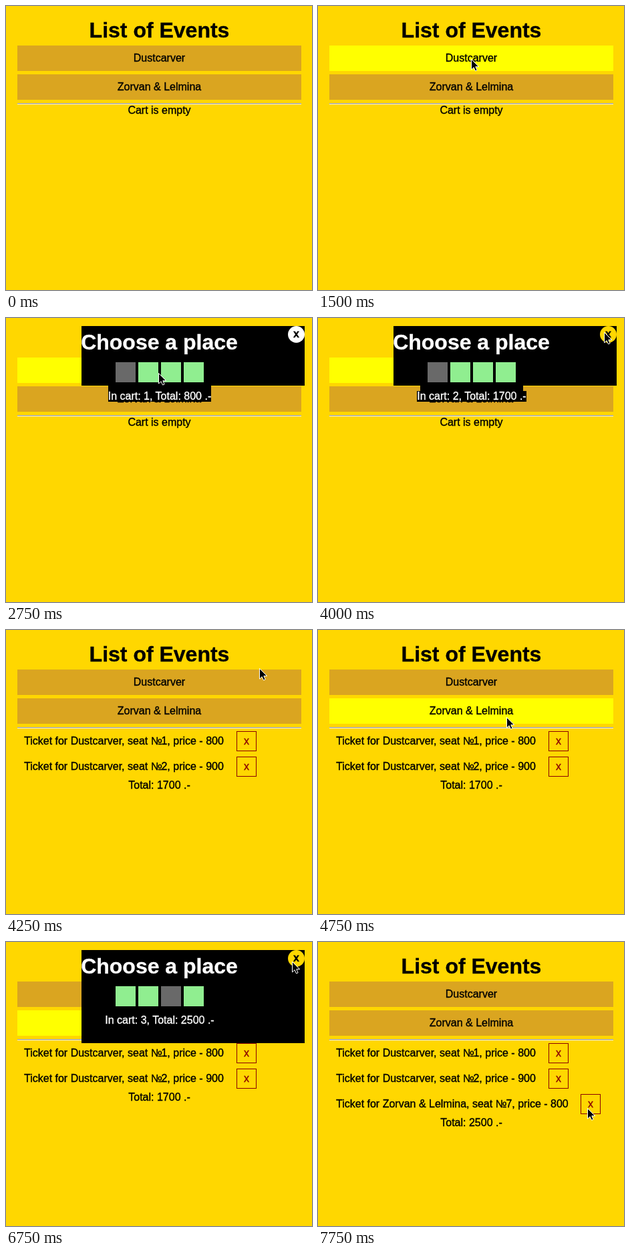
These frames come from a looping animation (458x424 px, 8000 ms). An HTML page:

```html
<!DOCTYPE html>
<html lang="en">
<head>
<meta charset="utf-8">
<title>List of Events</title>
<style>
  html, body { margin: 0; width: 100%; height: 100%; overflow: hidden; background: #ffd700; }
  svg { display: block; }
  text { font: 16px "Liberation Sans", Arial, sans-serif; white-space: pre; stroke-width: .35px; }
  .mid { text-anchor: middle; }
  .title { font-size: 32px; font-weight: bold; }
  .bold { font-weight: bold; }
  .num { letter-spacing: -1.4px; }
</style>
</head>
<body>
<svg id="stage" width="458" height="424" viewBox="0 0 458 424"></svg>
<script>
const LOOP = 8000;
const TICK = 250;
const MID = 229.5;
const CLOSE = { x: 434.5, y: 24.5, r: 12.5 };

// One popup visit per show
const SHOWS = [
  { name: 'Dustcarver', open: 1750, close: 4250 },
  { name: 'Zorvan &amp; Lelmina', open: 5000, close: 7000 }
];
const TICKETS = [
  { at: 2750, show: 0, seat: 1, price: 800 },
  { at: 3000, show: 0, seat: 2, price: 900 },
  { at: 5750, show: 1, seat: 7, price: 800 }
];

// Where the pointer stops: time, x, y
const STOPS = [
  [750, 273, 128], [1000, 246, 71], [1250, 246, 71], [1500, 229, 79],
  [2500, 190, 82], [2750, 228, 82], [3000, 228, 83], [3750, 427, 25], [4000, 428, 21],
  [4750, 282, 130], [5000, 282, 129], [5750, 246, 81], [6250, 405, 19], [6500, 427, 27],
  [6750, 428, 29], [7500, 397, 257], [7750, 403, 248]
];

const rowTop = i => 59 + i * 43;
const sum = list => list.reduce((n, t) => n + t.price, 0);
const rect = (x, y, w, h, fill) =>
  `<rect x="${x}" y="${y}" width="${w}" height="${h}" fill="${fill}"/>`;
const text = (x, y, str, cls = 'mid', color = '#000') =>
  `<text x="${x}" y="${y}" class="${cls}" fill="${color}" stroke="${color}">${str}</text>`;

function pointerAt(t) {
  const i = STOPS.findLastIndex(stop => stop[0] <= t);
  if (i < 0) return null;
  const [t0, x0, y0] = STOPS[i];
  const [t1, x1, y1] = STOPS[i + 1] || [LOOP, x0, y0];
  const k = (t - t0) / (t1 - t0);
  return { x: Math.round(x0 + (x1 - x0) * k), y: Math.round(y0 + (y1 - y0) * k) };
}

function stateAt(t) {
  const pointer = pointerAt(t);
  const open = SHOWS.findIndex(s => s.open <= t && t < s.close);
  const picked = TICKETS.filter(k => k.at <= t);
  const cart = picked.filter(k => SHOWS[k.show].close <= t);
  const over = i => t >= 1500 && pointer.y >= rowTop(i) && pointer.y < rowTop(i) + 38;
  const hover = open >= 0 ? open : SHOWS.findIndex((s, i) => over(i));
  return { pointer, open, picked, cart, hover };
}

function page({ hover }) {
  const rows = SHOWS.map((show, i) =>
    rect(17, rowTop(i), 425, 38, hover === i ? '#ff0' : '#daa520') +
    text(MID, rowTop(i) + 24, show.name));
  return text(MID, 47, 'List of Events', 'mid title') + rows.join('') +
    rect(17, 145, 425, 1, '#9a9a9a') + rect(17, 146, 425, 1, '#eee');
}

function cartList({ cart }) {
  if (!cart.length) return text(MID, 161, 'Cart is empty');
  const items = cart.map((t, i) => {
    const x = 345 + t.show * 48;
    const y = 151 + i * 38;
    const label = `Ticket for ${SHOWS[t.show].name}, seat <tspan class="num">№</tspan>${t.seat}, price - ${t.price}`;
    return text(27, y + 20, label, '') +
      `<rect x="${x + .5}" y="${y + .5}" width="29" height="29" fill="none" stroke="#8b0000"/>` +
      text(x + 15, y + 20, 'x', 'mid', '#8b0000');
  });
  return items.join('') + text(MID, 161 + cart.length * 38, `Total: ${sum(cart)} .-`);
}

function popup({ open, picked, cart, pointer }) {
  if (open < 0) return '';
  const first = picked.find(t => t.show === open);
  let out = rect(113, 12, 334, cart.length ? 139 : 89, '#000') +
    text(MID, 47, 'Choose a place', 'mid title', '#fff');
  for (let i = 0; i < 4; i++) {
    const taken = first && (first.seat - 1) % 4 === i;
    out += rect(164 + i * 34, 66, 30, 30, taken ? '#696969' : '#90ee90');
  }
  if (picked.length) {
    out += rect(153, 101, 154, 24, '#000');
    if (picked.length > 1) out += rect(148, 109, 164, 16, '#000');
    out += text(230, 122, `In cart: ${picked.length}, Total: ${sum(picked)} .-`, 'mid', '#fff');
  }
  const closing = Math.hypot(pointer.x - CLOSE.x, pointer.y - CLOSE.y) < CLOSE.r;
  return out +
    `<circle cx="${CLOSE.x}" cy="${CLOSE.y}" r="${CLOSE.r}" fill="${closing ? '#ffd700' : '#fff'}"/>` +
    text(CLOSE.x, 29, 'x', 'mid bold');
}

const arrow = ({ pointer: p }) => p
  ? `<path transform="translate(${p.x + .5} ${p.y + .5})" stroke="#fff" stroke-linejoin="round"
      d="M0 0V15.5L3.6 12.2 6 17.5 8.6 16.4 6.3 11.2H11.2Z"/>`
  : '';

const stage = document.getElementById('stage');
let shown = -1;

function draw() {
  const t = Math.floor(performance.now() % LOOP / TICK) * TICK;
  if (t !== shown) {
    const s = stateAt(t);
    stage.innerHTML = page(s) + cartList(s) + popup(s) + arrow(s);
    shown = t;
  }
  requestAnimationFrame(draw);
}
draw();
</script>
</body>
</html>
```
